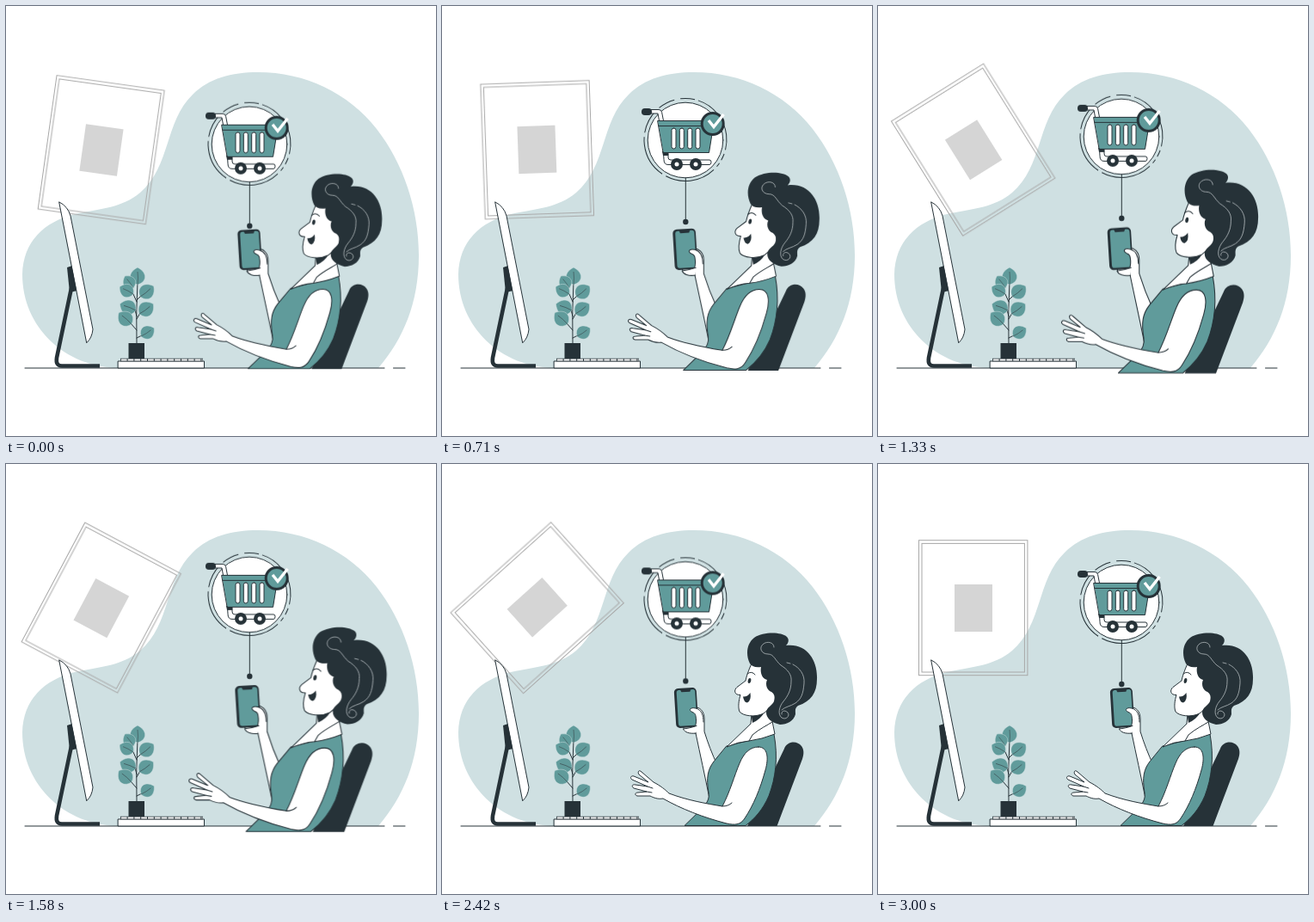
An HTML page without scripts that plays this animation: 500 px wide and 500 px high, repeating every 3040 ms.

```html
<!DOCTYPE html>
<html lang="en">
<head>
<meta charset="utf-8">
<title>Online shopping</title>
<style>
  html, body { margin: 0; width: 100%; height: 100%; overflow: hidden; background: #fff; }
  svg { display: block; width: 100vw; height: 100vh; }

  .dark { fill: #263238; }
  .teal { fill: #609b9b; }
  .ink { stroke: #263238; stroke-width: 1; stroke-linejoin: round; stroke-linecap: round; }
  .white { fill: #fff; }
  .none { fill: none; }
  .curl { fill: none; stroke: #b4bbbe; stroke-width: .8; stroke-linecap: round; }

  /* 73 ticks per loop, 24 per second */
  .picture, .woman, .cart { animation: 3040ms -8ms infinite linear; }
  .picture { transform-origin: 110.7px 167.2px; animation-name: spin; }
  .woman { transform-origin: 328px 309px; animation-name: beat; }
  .cart { animation-name: float; }

  @keyframes spin {
    0% { transform: rotate(8deg); animation-timing-function: steps(72); }
    98.62% { transform: rotate(728deg); animation-timing-function: steps(1); }
    98.63%, 100% { transform: rotate(720deg); }
  }
  @keyframes beat {
    0% { transform: scale(1.011); animation-timing-function: steps(6); }
    8.219% { transform: scale(1.0944); animation-timing-function: steps(1); }
    9.589% { transform: scale(1.0958); animation-timing-function: steps(13); }
    27.397% { transform: scale(1.0056); animation-timing-function: steps(1); }
    28.767% { transform: scale(1); }
    38.356% { transform: scale(1); animation-timing-function: steps(7); }
    47.945% { transform: scale(1.0972); animation-timing-function: steps(1); }
    49.315% { transform: scale(1.0889); animation-timing-function: steps(6); }
    57.534% { transform: scale(1.0056); animation-timing-function: steps(1); }
    58.904%, 100% { transform: scale(1); }
  }
  @keyframes float {
    0% { transform: translateY(-.2px); }
    48.2% { transform: translateY(-10px); }
    97.5%, 100% { transform: translateY(0); }
  }
</style>
</head>
<body>
<svg viewBox="0 0 500 500">
  <defs>
    <g id="leaf">
      <path class="teal" d="M0 0C-11-3-12-14 0-20C12-14 11-3 0 0Z" stroke="#cfe0e2" stroke-width=".5"/>
      <path class="none" d="M0 0Q1-8 0-15" stroke="#38474c" stroke-width=".6"/>
    </g>
    <rect id="slot" class="white ink" y="147" width="5" height="24" rx="2.5"/>
    <g id="wheel">
      <circle class="dark" r="7"/>
      <circle class="white" r="2.5"/>
    </g>
  </defs>

  <path fill="#cfe0e2" d="M131 421C68 420 19 373 19 312C20 274 44 251 80 242C112 235 134 235 156 217C192 186 184 135 217 103C236 84 262 77 293 77C348 77 398 101 431 143C462 183 480 236 480 290C480 345 462 387 433 421Z"/>

  <g class="picture none" stroke="#a8a8a8">
    <rect x="47.5" y="88.7" width="126.4" height="157"/>
    <rect x="51" y="92.4" width="119.4" height="149.6"/>
    <rect x="89" y="140" width="44" height="55" fill="#d5d5d5" stroke="none"/>
  </g>

  <path class="ink none" d="M22 421H440M450.5 421H464"/>

  <!-- monitor -->
  <path d="M76 328L59 409Q57.500 418.500 65 418.500H109" fill="none" stroke="#263238" stroke-width="4.600"/>
  <path class="dark" d="M71 304L77 302L83 331L74 333Z"/>
  <path class="white ink" d="M62 228Q72 233 75 244L101 376Q100 386 94 391.500Z"/>

  <!-- plant and keyboard -->
  <path class="ink none" d="M152 393Q151 355 153 320M152 344L148 335M152 342L157 337M152 361L150 353M152 377L145 369M152 364L156 357M152 386L158 383"/>
  <use href="#leaf" transform="translate(153 324)"/>
  <use href="#leaf" transform="translate(148 328) rotate(-35) scale(.85)"/>
  <use href="#leaf" transform="translate(148 335) rotate(-62) scale(.9)"/>
  <use href="#leaf" transform="translate(156 338) rotate(52)"/>
  <use href="#leaf" transform="translate(151 354) rotate(-68)"/>
  <use href="#leaf" transform="translate(155 358) rotate(55)"/>
  <use href="#leaf" transform="translate(146 370) rotate(-48)"/>
  <use href="#leaf" transform="translate(157 384) rotate(58) scale(.9)"/>
  <rect class="dark" x="142.5" y="392" width="18.5" height="19"/>
  <rect class="white ink" x="130.5" y="413" width="100" height="8"/>
  <path d="M133 411.500H229" fill="none" stroke="#263238" stroke-width="3.400"/>
  <path d="M133.800 411.500H228.500" fill="none" stroke="#fff" stroke-width="1.800" stroke-dasharray="6.800 1"/>

  <g class="woman">
    <path class="dark" d="M398 331C401 322 413 321 418 328C421 332 421 337 419 343L389.500 421H355Z"/>

    <!-- far arm and phone -->
    <path class="white ink" d="M291 283C300 281 305 288 305 296L305 311C309 324 314 337 320 350L311 389C306 364 300 337 295 313C283 312 280 309 281 305Z"/>
    <g transform="rotate(-3.5 284 283.5)">
      <rect class="dark" x="271" y="260.500" width="26" height="46" rx="4.500"/>
      <rect class="teal" x="273.800" y="262.600" width="21.600" height="41.800" rx="3"/>
      <path class="dark" d="M278 261.500H291L289.500 265H279.500Z"/>
    </g>
    <path class="white ink" d="M304 300C304 292 302 286 295 284C289 282.500 286 286 291 288.500C295 290 295 292 295.500 297C296 303 293 306 295 313"/>
    <path class="white ink" d="M296 304.500C290 306.500 285 307.500 280.500 308C282 312 288 314 295 313"/>

    <!-- body -->
    <path class="teal ink" d="M331 328L386 314C391 341 388 365 380 386C373 402 364 412 353 420.500H282L303 400C309 393 311 389 310 382C307 365 309 355 316 346Z"/>
    <path class="white ink" d="M360 290L359 302L331 329Q344 323 357 322Q372 320 387 314L384 299V286Z"/>
    <path class="ink none" d="M384 300C378 304 369 308 361 315L357 322"/>
    <path class="dark" d="M359.500 291L374 290Q370 297 361 301Z"/>

    <!-- near arm -->
    <path class="white ink" d="M368 329C379 329 380 342 376 356C370 378 362 397 352 412C347 420 340 420 331 418C304 411 278 401 257 389C251 390 246 388 242 386L227 386C224 385 224 382 228 382L238 381L223 377C220 375 221 372 225 373L239 375L221 367C218 365 220 362 223 363L240 370L229 361C227 358 229 355 232 358L246 370C254 374 260 379 264 383C285 391 308 395 326 398C335 381 340 362 346 348C351 336 358 329 368 329Z"/>
    <path class="ink none" d="M238 381L244 382M239 375L245 377M326 398Q333 398 337 394"/>

    <!-- head -->
    <path class="white ink" d="M360 232C356 241 354 247 353 252L343 259.500C339 263 340 269 347 268.500C345 275 344 283 346 288C350 293 364 295 374 290L387 279L389 237Z"/>
    <path class="dark" d="M358 232C353 222 354 209 363 202C374 195 394 195 401 201C404 204 403 208 400 211C424 208 437 228 436 250C436 266 429 276 414 281C410 284 411 287 411 291C409 299 401 303 393 303C384 301 377 296 377 289C377 283 384 281 386 276C388 270 386 266 381 264C377 261 376 255 378 251C371 249 370 241 371 236C364 237 360 235 358 232Z"/>
    <ellipse class="dark" cx="357.5" cy="252" rx="1.800" ry="3" transform="rotate(10 357.5 252)"/>
    <path class="ink none" d="M355 244Q360 240 364 245"/>
    <path class="dark" d="M350 270.500Q355 271 358.500 266Q360 275 355 277.500Q351 277 350 270.500Z"/>
    <path class="curl" d="M386 213C386 207 378 206 374 209C368 213 371 221 379 221C386 221 387 228 394 234C402 239 407 245 406 253C406 263 402 270 397 276C392 282 390 291 395 295C400 298 405 293 402 289C398 285 394 288 395 291M401 231L405 232M408 233C416 237 422 245 421 255C420 267 418 273 411 278C405 282 399 282 395 286"/>
  </g>

  <g class="cart">
    <circle class="ink none" cx="283" cy="160.5" r="48" stroke-dasharray="17 4 72 5 8 4 5 5 60 5 50 5 30 4 20 7.6" transform="rotate(-97 283 160.5)" style="stroke-linecap: butt"/>
    <circle class="white ink" cx="283" cy="161" r="43.800"/>
    <path class="ink none" d="M283.300 205V256"/>
    <circle class="dark" cx="283.300" cy="256" r="3.200"/>

    <path class="white ink" d="M242 125.500H252Q255 125.500 255.600 128.500L258 141H253L251 130H242Z"/>
    <rect class="dark" x="232" y="124" width="12" height="8" rx="3.800"/>
    <path class="white ink" d="M258 177H263V181Q263 184 266 184H311Q313 184 313 186.500Q313 189.500 311 189.500H263Q258 189.500 258 184Z"/>
    <path class="dark" d="M256 174H264L263 179H257Z"/>
    <path class="teal ink" d="M251 138.500H316.500L310.500 175.500H257.500Z"/>
    <path class="ink none" d="M252 144.500H315"/>
    <use href="#slot" x="267"/>
    <use href="#slot" x="276.3"/>
    <use href="#slot" x="285.7"/>
    <use href="#slot" x="295"/>
    <use href="#wheel" x="273" y="189"/>
    <use href="#wheel" x="295" y="189"/>
    <circle class="teal" cx="314.7" cy="142" r="12.5" stroke="#263238" stroke-width="3"/>
    <path d="M310 138L316 145.500L327.500 131" fill="none" stroke="#fff" stroke-width="3.400"/>
  </g>
</svg>
</body>
</html>
```
